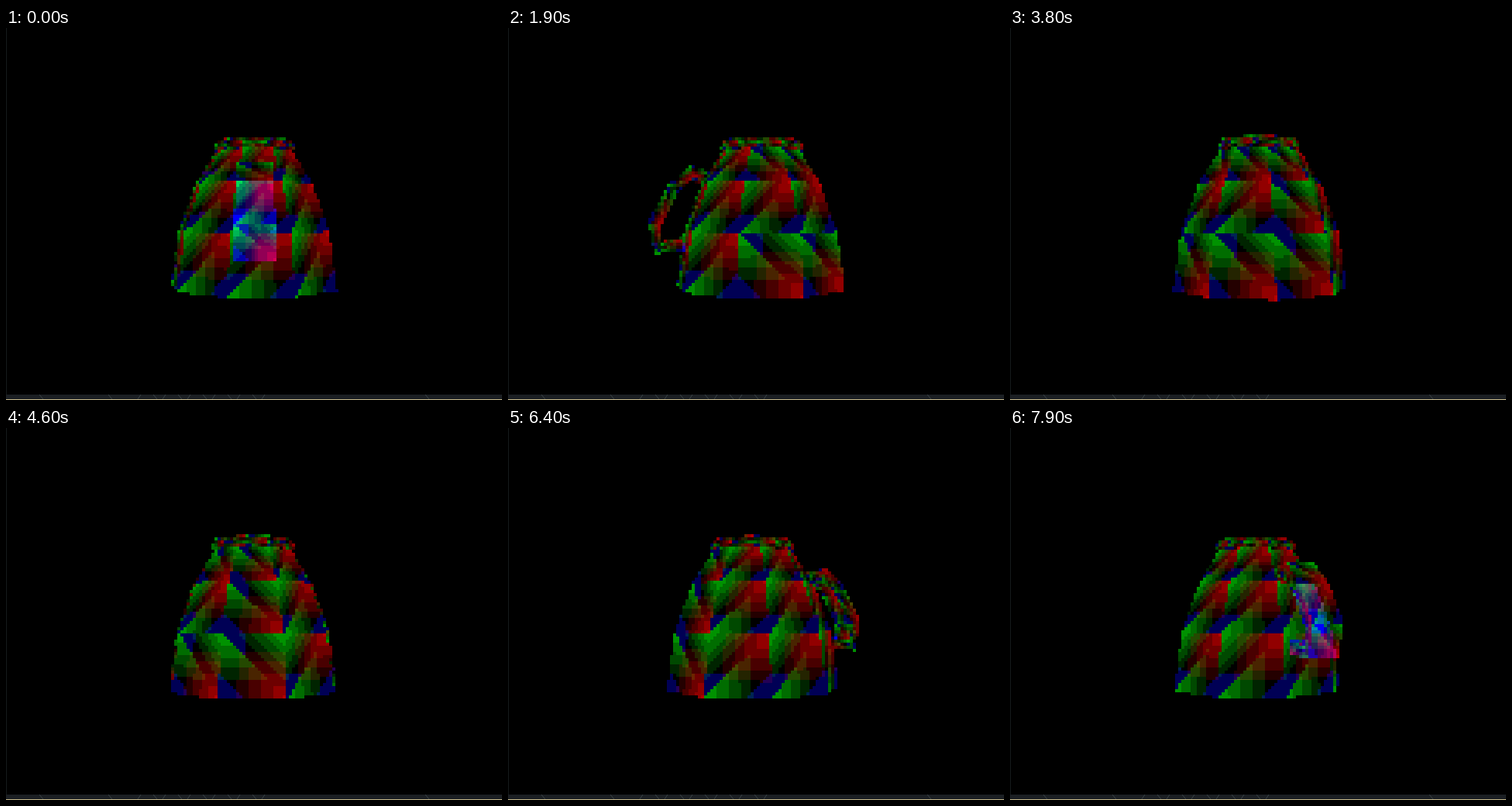
These frames come from a looping animation (640x480 px, 8000 ms). An HTML page with a canvas:

```html
<!DOCTYPE html>
<html>
<head>
<meta charset="utf-8">
<style>
html, body { margin: 0; width: 100%; height: 100%; overflow: hidden; background: #000; }
canvas { display: block; }
</style>
</head>
<body>
<canvas id="stage" width="640" height="480"></canvas>
<script>
const ctx = document.getElementById('stage').getContext('2d');
const W = 160, H = 118, CELL = 4, EYE = 700, CX = 321, CY = 240, LOOP = 8000;
const RAD = Math.PI / 180, SEGMENTS = 9;

// [time in ms, turn in degrees]
const turns = [[0, 0], [1900, 79], [3000, 145], [4600, 204], [5700, 231], [7000, 271], [8000, 333]];
// [height, radius] from top to bottom
const wall = [[-80, 52], [-38, 79], [21.5, 101], [93, 111]];
const rim = [[-94, 49], [-87, 53], [-80, 52]];
// [distance from axis, height] along the handle
const handle = [[66, -44], [84, -52], [108, -30], [130, 12], [125, 42], [94, 37]];

const depth = new Float32Array(W * H);
const pixels = new Uint8Array(W * H * 3);
let sin = 0, cos = 1;

// Turns a point (radial, tangential, height) and projects it to the pixel grid.
function point(r, t, y) {
  const x = -r * sin + t * cos, z = r * cos + t * sin, k = EYE / (EYE - z);
  return [(CX + x * k - 1) / CELL, (CY + y * k - 1) / CELL, z];
}

// Writes one pixel: 3 bits red, 3 bits green, 2 bits blue.
function plot(i, r, g, b, glow) {
  const p = i * 3;
  const level = v => Math.max(0, Math.floor(v * 5.9 - .6));
  const old = glow ? pixels.subarray(p, p + 3) : [0, 0, 0];
  pixels[p] = Math.min(7, level(r) + (old[0] >> 1));
  pixels[p + 1] = Math.min(7, level(g * .95) + (old[1] >> 1));
  pixels[p + 2] = Math.min(3, Math.floor(b * 1.6) + old[2] + glow);
}

// The corners a, b, c carry red, green and blue.
function triangle(a, b, c, glow) {
  const cross = (p, q, x, y) => (q[0] - p[0]) * (y - p[1]) - (q[1] - p[1]) * (x - p[0]);
  const area = cross(a, b, c[0], c[1]);
  if (area >= 0) return;
  const low = i => Math.max(0, Math.floor(Math.min(a[i], b[i], c[i])));
  const high = i => Math.ceil(Math.max(a[i], b[i], c[i]));
  for (let y = low(1); y < Math.min(H, high(1)); y++) {
    for (let x = low(0); x < Math.min(W, high(0)); x++) {
      const red = cross(b, c, x + .5, y + .5) / area;
      const green = cross(c, a, x + .5, y + .5) / area;
      const blue = 1 - red - green;
      if (red < 0 || green < 0 || blue < 0) continue;
      const z = red * a[2] + green * b[2] + blue * c[2], i = y * W + x;
      if (z < depth[i]) continue;
      plot(i, red, green, blue, glow && depth[i] > -EYE ? 1 : 0);
      depth[i] = z;
    }
  }
}

function quad(tl, tr, br, bl, falling, glow) {
  if (falling) {
    triangle(br, tr, tl, glow);
    triangle(br, tl, bl, glow);
  } else {
    triangle(tr, bl, br, glow);
    triangle(tr, tl, bl, glow);
  }
}

// Joins a grid of points with quads.
function mesh(rows, columns, at, falling, glow = () => false) {
  for (let j = 0; j + 1 < rows; j++) {
    for (let k = 0; k < columns; k++) {
      quad(at(j, k), at(j, k + 1), at(j + 1, k + 1), at(j + 1, k), falling(j, k), glow(j));
    }
  }
}

function lathe(rings, n, falling) {
  mesh(rings.length, n, (j, k) => {
    const [y, r] = rings[j], a = (16 - 360 / n * k) * RAD;
    return point(r * Math.cos(a) - 6, -r * Math.sin(a), y);
  }, falling);
}

function tube(path, sides) {
  mesh(path.length, sides, (i, k) => {
    const [r, y] = path[i];
    const p = path[Math.max(0, i - 1)], q = path[Math.min(path.length - 1, i + 1)];
    const dr = q[0] - p[0], dy = q[1] - p[1], a = (k - .5) / sides * 2 * Math.PI;
    const out = 11 * Math.cos(a) / Math.hypot(dr, dy);
    return point(r + dy * out, 30 * Math.sin(a), y - dr * out);
  }, (i, k) => (i + k) % 2, i => i > 1);
}

function turnAt(t) {
  const i = turns.findIndex(k => k[0] > t);
  const [t0, a0] = turns[i - 1], [t1, a1] = turns[i];
  return a0 + (a1 - a0) * (t - t0) / (t1 - t0);
}

function frame() {
  ctx.fillStyle = '#000';
  ctx.fillRect(0, 0, 640, 480);
  ctx.fillStyle = '#14191b';
  ctx.fillRect(0, 0, 1, 473);
  ctx.fillStyle = '#1b1f23';
  ctx.fillRect(0, 473, 640, 7);
  ctx.strokeStyle = '#3a4246';
  ctx.beginPath();
  const scratch = (x, dx) => {
    ctx.moveTo(x, 473);
    ctx.lineTo(x + dx, 479);
  };
  for (let i = 0; i < 11; i++) scratch(174 + i * 16, i % 2 ? 5 : -4);
  [43, 132, 541].forEach(x => scratch(x, 5));
  ctx.stroke();
  ctx.fillStyle = '#c8b98a';
  ctx.fillRect(0, 479, 640, 1);
}

function draw(now) {
  const a = turnAt(Math.floor(now % LOOP / 100) * 100) * RAD;
  sin = Math.sin(a);
  cos = Math.cos(a);
  depth.fill(-2 * EYE);
  pixels.fill(0);
  lathe(wall, SEGMENTS, (j, k) => j === 1 ? k === 5 : k > 1 && k < 6);
  lathe(rim, SEGMENTS + 3, (j, k) => (j + k) % 2);
  tube(handle, 4);
  frame();
  for (let i = 0; i < W * H; i++) {
    const [r, g, b] = pixels.subarray(i * 3, i * 3 + 3);
    if (!(r || g || b)) continue;
    ctx.fillStyle = `rgb(${Math.round(r * 255 / 7)},${Math.round(g * 255 / 7)},${b * 85})`;
    ctx.fillRect(i % W * CELL + 1, Math.floor(i / W) * CELL + 1, CELL, CELL);
  }
}

const start = performance.now();
function tick() {
  draw(performance.now() - start);
  requestAnimationFrame(tick);
}
tick();
</script>
</body>
</html>
```
